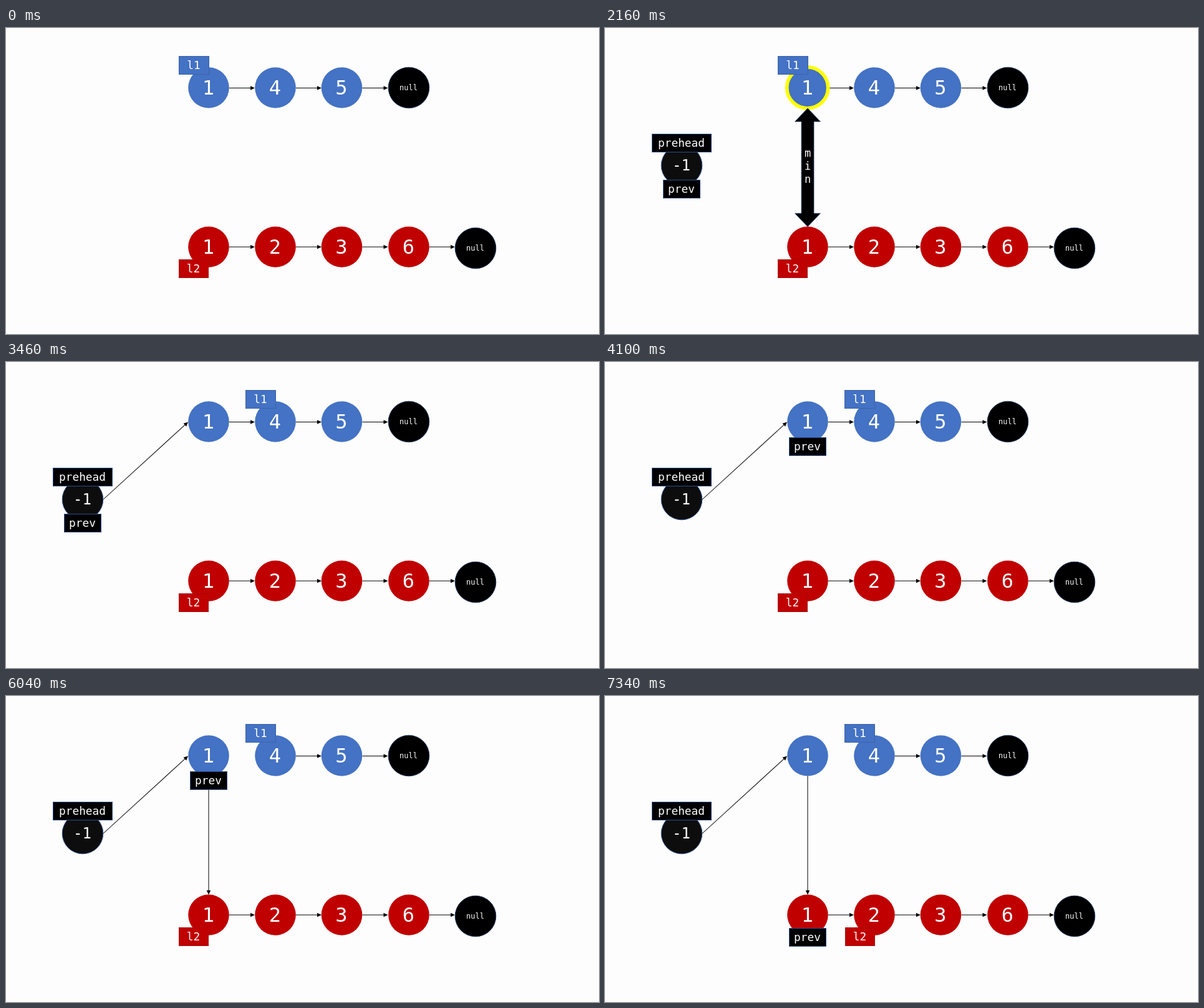
Write an HTML page that moves like this. It is 951 px wide and 492 px high and loops after 8000 ms.

```html
<!DOCTYPE html>
<html lang="en">
<head>
<meta charset="utf-8">
<title>Merging two sorted lists</title>
<style>
  html, body { margin: 0; width: 100%; height: 100%; overflow: hidden; background: #fdfdfd; }
  svg { display: block; width: 951px; height: 492px; }
  text { font-family: "DejaVu Sans Mono", monospace; fill: #fff; text-anchor: middle; }
</style>
</head>
<body>
<svg id="stage" viewBox="0 0 951 492"></svg>
<script>
const LOOP = 8000;
const BLUE = '#4472c4', RED = '#c00000', BLACK = '#000', EDGE = '#2f528f';
const COLUMNS = [325, 432, 538.5, 646, 753];

const text = (x, y, size, value) => `<text x="${x}" y="${y}" font-size="${size}">${value}</text>`;

const node = (x, y, fill, value, size = 32, edge = 'none') =>
  `<circle cx="${x}" cy="${y}" r="32.8" fill="${fill}" stroke="${edge}"/>` +
  text(x - 0.5, y + size * 0.34, size, value);

const nullNode = (x, y) => node(x, y, BLACK, 'null', 12, '#1f3660');

const label = (x, y, width, fill, edge, value) =>
  `<rect x="${x + 0.5}" y="${y + 0.5}" width="${width}" height="29" fill="${fill}" stroke="${edge}"/>` +
  text(x + width / 2, y + 21, 17.8, value);

const prev = (x, y) => label(x, y, 59, BLACK, EDGE, 'prev');
const l1 = x => label(x, 45, 48, BLUE, '#3a62a8', 'l1');
const l2 = x => label(x, 372, 47, RED, '#a50d0d', 'l2');

// Thin arrow, drawn along its own x axis
function link(x1, y1, x2, y2) {
  const length = Math.hypot(x2 - x1, y2 - y1);
  const angle = Math.atan2(y2 - y1, x2 - x1) * 180 / Math.PI;
  return `<g transform="translate(${x1} ${y1}) rotate(${angle})">
    <path d="M0 0H${length - 5}" stroke="#000"/>
    <path d="M${length} 0l-7 -3.3v6.6z"/></g>`;
}

// Thick double arrow, drawn downwards from its upper tip
function minArrow(x1, y1, x2, y2) {
  const length = Math.hypot(x2 - x1, y2 - y1);
  const angle = Math.atan2(x1 - x2, y2 - y1) * 180 / Math.PI;
  const shaft = length - 43;
  const letters = [...'min'].map((c, i) => text(0, length / 2 + 21 * (i - 1) + 4, 17, c)).join('');
  return `<g transform="translate(${x1} ${y1}) rotate(${angle})">
    <path d="M0 0l20.5 21.5h-10.5v${shaft}h10.5L0 ${length}l-20.5 -21.5h10.5v${-shaft}h-10.5z"
      stroke="${EDGE}" stroke-width=".8"/>${letters}</g>`;
}

const ring = y => `<circle cx="324.7" cy="${y}" r="33" fill="none" stroke="#ff0" stroke-width="5.6"/>`;

const during = (start, end, content) => `<g data-start="${start}" data-end="${end}">${content}</g>`;

const row = (y, fill, values) => values.map((v, i) => node(COLUMNS[i], y, fill, v)).join('');
const rowLinks = (y, from, to) => COLUMNS.slice(from, to)
  .map(x => link(x + 33, y, x + 74, y)).join('');

const stage = document.getElementById('stage');
stage.innerHTML = [
  rowLinks(96.5, 1, 3),
  during(0, 6040, rowLinks(96.5, 0, 1)),
  rowLinks(352, 0, 4),
  during(2820, LOOP, link(156, 221, 292, 96.5)),
  during(6040, LOOP, link(325, 129, 325, 319.5)),
  row(96, BLUE, [1, 4, 5]),
  nullNode(646, 96),
  row(352, RED, [1, 2, 3, 6]),
  nullNode(753, 354),
  during(2160, 2820, ring(96)),
  during(5400, 6040, ring(351.5)),
  during(1520, 2820, minArrow(325, 129, 325, 319.5)),
  during(4740, 6040, minArrow(418, 125.5, 334, 319.5)),
  during(220, LOOP, node(123, 221, '#0d0d0d', '-1', 24, EDGE) +
    label(75, 170, 95, BLACK, EDGE, 'prehead')),
  during(860, 4100, prev(93, 244)),
  during(4100, 7340, prev(295, 121)),
  during(7340, LOOP, prev(295, 373)),
  during(0, 3460, l1(277)),
  during(3460, LOOP, l1(384)),
  during(0, 6700, l2(277)),
  during(6700, LOOP, l2(385)),
].join('');

const timed = [...stage.querySelectorAll('[data-start]')];

function draw() {
  const t = performance.now() % LOOP;
  for (const part of timed) {
    const { start, end } = part.dataset;
    part.style.display = t >= +start && t < +end ? '' : 'none';
  }
  requestAnimationFrame(draw);
}
draw();
</script>
</body>
</html>
```
